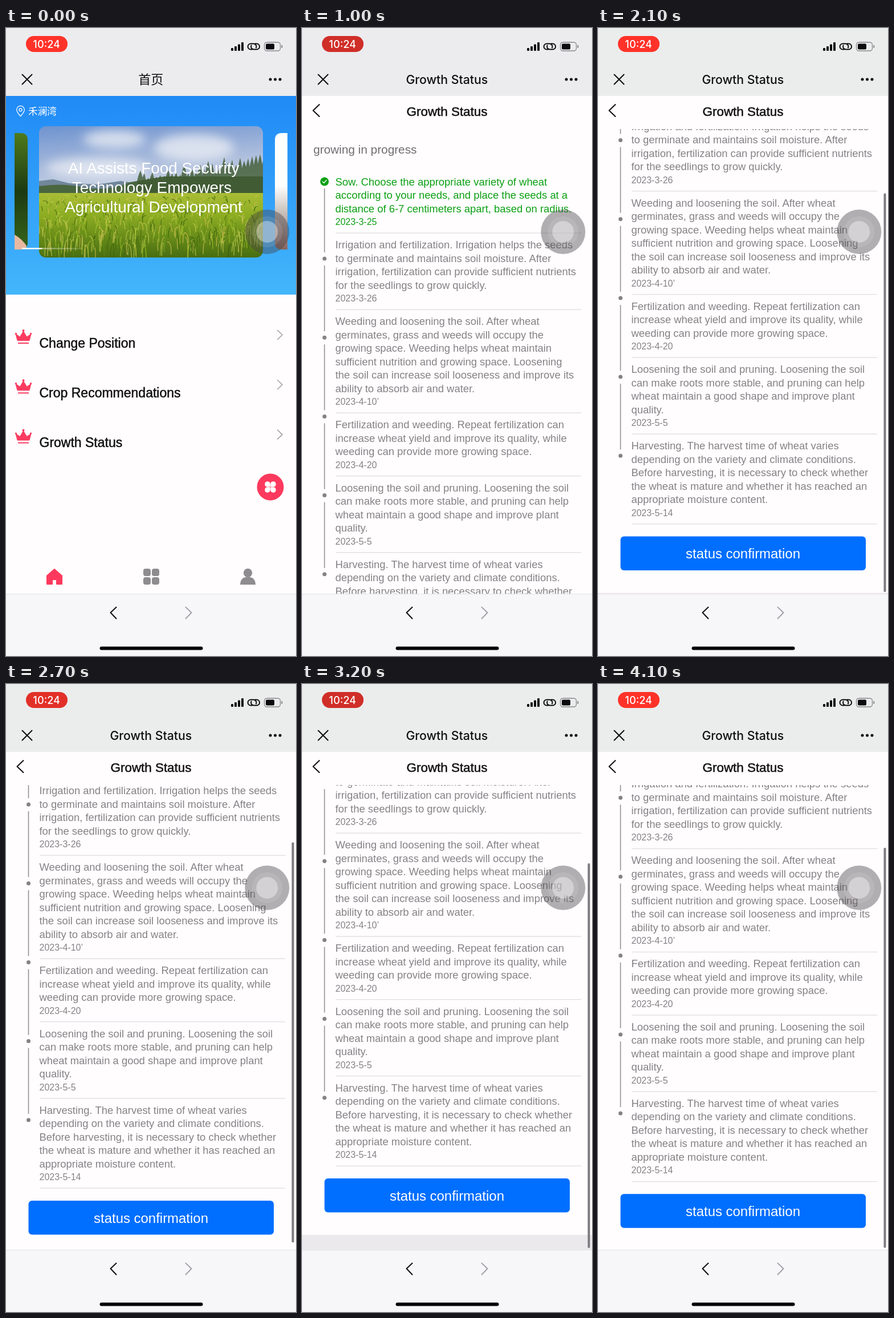
An HTML page that plays this animation: 509 by 1100 pixels, repeating every 4.2 s.

```html
<!DOCTYPE html>
<html lang="en">
<head>
<meta charset="utf-8">
<title>Growth Status</title>
<style>
  html, body { margin: 0; width: 100%; height: 100%; overflow: hidden; background: #fff; }
  svg { display: block; width: 509px; height: 1100px; }
  text { font-family: "Liberation Sans", Arial, sans-serif; white-space: pre; }
  .ui { font-family: Inter, "Noto Sans CJK SC", "Noto Sans CJK", sans-serif; }
  .cjk { font-family: "Noto Sans CJK SC", "Noto Sans CJK", sans-serif; }
  .medium { font-size: 23px; stroke: #111; stroke-width: .5; fill: #111; }
  .line { fill: none; stroke-width: 2; stroke-linecap: round; stroke-linejoin: round; }
  .mid { text-anchor: middle; }
</style>
</head>
<body>
<svg viewBox="0 0 509 1100" xmlns="http://www.w3.org/2000/svg">
  <defs>
    <linearGradient id="blue" x2="0" y2="1"><stop stop-color="#208af6"/><stop offset="1" stop-color="#43b6fb"/></linearGradient>
    <linearGradient id="sky" x2=".25" y2="1"><stop stop-color="#6e93cf"/><stop offset=".55" stop-color="#a9bbdc"/><stop offset="1" stop-color="#d3d9e6"/></linearGradient>
    <linearGradient id="field" x2="0" y2="1"><stop stop-color="#a9bd35"/><stop offset=".35" stop-color="#8cac22"/><stop offset="1" stop-color="#476d10"/></linearGradient>
    <linearGradient id="leaf" x2="0" y2="1"><stop stop-color="#4f7a1c"/><stop offset=".5" stop-color="#1d3a12"/><stop offset="1" stop-color="#38661c"/></linearGradient>
    <linearGradient id="soil" x2="0" y2="1"><stop offset=".45" stop-color="#fff"/><stop offset=".65" stop-color="#cfc9c4"/><stop offset="1" stop-color="#8a665f"/></linearGradient>
    <linearGradient id="dash"><stop offset=".32" stop-color="#fff"/><stop offset=".36" stop-color="#fff" stop-opacity=".4"/><stop offset="1" stop-color="#fff" stop-opacity=".15"/></linearGradient>
    <filter id="soft"><feGaussianBlur stdDeviation="9"/></filter>
    <clipPath id="card"><rect x="58" y="172" width="393" height="230" rx="12"/></clipPath>
    <clipPath id="view"><rect y="177" width="509" height="815"/></clipPath>
    <clipPath id="left"><path d="M15 184h11q12 0 12 12v180q0 12-12 12H15z"/></clipPath>
  </defs>
  <rect width="509" height="1100" fill="#fffdfe"/>

  <g id="home">
    <rect y="119" width="509" height="348" fill="url(#blue)"/>
    <g class="line" stroke="#fff" style="stroke-width:1.3">
      <path d="M25.500 154.500c-4-4.500-6.800-7.500-6.800-11.300a6.800 6.800 0 0 1 13.600 0c0 3.800-2.800 6.800-6.800 11.300z"/><circle cx="25.500" cy="143.300" r="2.500"/>
    </g>
    <text class="cjk" x="39" y="151.500" font-size="16.700" fill="#fff">禾澜湾</text>
    <g clip-path="url(#left)">
      <rect x="15" y="184" width="23" height="204" fill="url(#leaf)"/>
      <path d="M15 362q14 8 22 21l-8 6H15z" fill="#e8b9a2"/>
    </g>
    <path d="M494 184h-10q-12 0-12 12v180q0 12 12 12h10z" fill="url(#soil)"/>
    <g clip-path="url(#card)">
      <rect x="58" y="172" width="393" height="130" fill="url(#sky)"/>
      <g fill="#eef0f5" opacity=".75" filter="url(#soft)">
        <ellipse cx="190" cy="195" rx="55" ry="16"/><ellipse cx="330" cy="210" rx="70" ry="24"/><ellipse cx="160" cy="245" rx="90" ry="18"/>
      </g>
      <path d="M58 268l25-3 28 7 50 2 40-6 60 8v20H58z" fill="#71879b"/>
      <path d="M58 277q40-6 80 2t80-9l60-10h173v32H58z" fill="#49663f"/>
      <path id="trees" fill="#3f5a33" opacity=".8"/>
      <rect x="58" y="289" width="393" height="113" fill="url(#field)"/>
      <g id="blades" fill="none" stroke-linecap="round"></g>
    </g>
    <g font-size="27.900" fill="#fff" class="mid">
      <text x="259" y="254.500">AI Assists Food Security</text>
      <text x="256" y="289">Technology Empowers</text>
      <text x="259" y="323">Agricultural Development</text>
    </g>
    <rect x="28" y="385" width="104" height="2.500" fill="url(#dash)"/>
    <g id="menu"></g>
    <circle cx="464" cy="804" r="23.500" fill="#fd3a5d"/>
    <path d="M463 803h-4.500a4 4 0 1 1 4.500-4.500zM465 803v-4.500a4 4 0 1 1 4.500 4.500zM463 805v4.500a4 4 0 1 1-4.500-4.500zM465 805h4.500a4 4 0 1 1-4.500 4.500z" fill="#fff" stroke="#fff" stroke-width="1.500" stroke-linejoin="round"/>
    <path d="M85 948l13 11.500v14.500h-9v-8h-8v8h-9v-14.500z" fill="#fd3a5d" stroke="#fd3a5d" stroke-width="2" stroke-linejoin="round"/>
    <g fill="#8e8c8f">
      <rect x="241" y="947" width="13" height="13" rx="4"/><rect x="256" y="947" width="13" height="13" rx="4"/>
      <rect x="241" y="962" width="13" height="13" rx="4"/><rect x="256" y="962" width="13" height="13" rx="4"/>
      <circle cx="424.500" cy="954.500" r="7.700"/><path d="M411 975q0-11 9-13h9q9 2 9 13z"/>
    </g>
  </g>

  <g id="status">
    <g clip-path="url(#view)">
      <rect y="177" width="509" height="815" fill="#ece9ec"/>
      <g id="page">
        <rect width="509" height="1197" fill="#fffdfe"/>
        <text x="20" y="220" font-size="20.800" fill="#6f6d70">growing in progress</text>
      </g>
    </g>
    <path class="line" d="M30.500 134L19.500 144.500L30.500 155" stroke="#111"/>
    <text class="medium mid" x="254.500" y="154" style="font-size:22.400px">Growth Status</text>
    <rect id="bar" x="501.500" width="4" rx="2" fill="#7d7b7f"/>
  </g>

  <rect id="head" width="509" height="119"/>
  <rect id="pill" x="35" y="14" width="73" height="28" rx="14"/>
  <text class="ui mid" x="71.200" y="34.600" font-size="18.200" font-weight="500" fill="#fff">10:24</text>
  <g fill="#0c0c0e">
    <rect x="395" y="35" width="4" height="5" rx="1"/><rect x="401" y="32" width="4" height="8" rx="1"/>
    <rect x="407" y="28.500" width="4" height="11.500" rx="1"/><rect x="413" y="25" width="4" height="15" rx="1"/>
    <rect x="456" y="27.500" width="15" height="10" rx="2"/>
    <circle cx="464" cy="90" r="2.500"/><circle cx="472.500" cy="90" r="2.500"/><circle cx="481" cy="90" r="2.500"/>
  </g>
  <g class="line" stroke="#0c0c0e">
    <path d="M432 37.500h-2.500a5 5 0 0 1 0-10h5a5 5 0 0 1 4.500 7M437 27.500h3a5 5 0 0 1 0 10h-5a5 5 0 0 1-4.500-7"/>
    <rect x="453.500" y="25" width="28" height="15" rx="4.500" stroke="#88878a" style="stroke-width:1.300"/>
    <path d="M484.300 31v3" stroke="#88878a"/>
    <path d="M28.500 81.500l17 17M45.500 81.500l-17 17"/>
  </g>
  <text id="title" class="ui mid" x="254.300" y="97.800" fill="#111" font-weight="500"></text>

  <rect y="991" width="509" height="109" fill="#f7f6f9"/>
  <rect y="991" width="509" height="1" fill="#e6e4e8"/>
  <path class="line" d="M193.500 1014.500L183.500 1024L193.500 1034.500" stroke="#111"/>
  <path class="line" d="M315.500 1014.500L325.500 1024L315.500 1034.500" stroke="#a5a4a8"/>
  <rect x="164.500" y="1083.500" width="181" height="6" rx="3" fill="#050505"/>

  <circle cx="458.300" cy="357" r="39" fill="#464146" fill-opacity=".42"/>
  <circle cx="458.300" cy="357" r="27" fill="#fff" fill-opacity=".1"/>
  <circle cx="458.300" cy="357" r="19" fill="#fff" fill-opacity=".36"/>
</svg>

<script>
const $ = id => document.getElementById(id);
const add = (id, markup) => $(id).insertAdjacentHTML('beforeend', markup);
const set = (id, attrs) => { for (const k in attrs) $(id).setAttribute(k, attrs[k]); };

let seed = 7;
const rnd = (a, b) => a + (b - a) * ((seed = seed * 16807 % 2147483647) / 2147483647);

// Banner photo: tree row and rice
let trees = '';
for (let x = 236; x < 455; x += 7) {
  const tip = 262 - (x - 236) * .17 + rnd(-12, 8), h = 290 - tip;
  trees += `M${x} ${tip}q${rnd(5, 9)} 24 4 ${h}h-8q-6 ${-h / 2} 4 ${-h}z`;
}
set('trees', { d: trees });
['#c3cf55', '#5d8a14', '#d2c255', '#3c620c', '#a0c22c'].forEach(color => {
  let d = '';
  for (let i = 0; i < 110; i++) {
    const depth = rnd(0, 1), y = 296 + depth * 108, h = 3 + depth * 20;
    d += `M${rnd(58, 451)} ${y}q${rnd(-2, 2)} ${-h} ${rnd(-7, 7)} ${-h}`;
  }
  add('blades', `<path d="${d}" stroke="${color}" stroke-width="1.3" opacity=".75"/>`);
});

['Change Position', 'Crop Recommendations', 'Growth Status'].forEach((label, i) => add('menu', `
  <g transform="translate(0 ${i * 87.3})">
    <path d="M20 547.500L17 536l7.500 5L30.500 531l6 10 7.500-5-3 11.500z" fill="#fb3b60" stroke="#fb3b60" stroke-linejoin="round"/>
    <path d="M21 552h19" stroke="#fb3b60" stroke-width="2"/>
    <g fill="#fb3b60"><circle cx="30.500" cy="530" r="2"/><circle cx="17.500" cy="535.500" r="1.700"/><circle cx="43.500" cy="535.500" r="1.700"/></g>
    <text class="medium" x="58.500" y="559.500">${label}</text>
    <path class="line" d="M476.500 529.500L485 537.500L476.500 545.500" stroke="#a09ea1" style="stroke-width:1.5"/>
  </g>`));

const steps = [
  ['2023-3-25', 'Sow. Choose the appropriate variety of wheat|according to your needs, and place the seeds at a|distance of 6-7 centimeters apart, based on radius.'],
  ['2023-3-26', 'Irrigation and fertilization. Irrigation helps the seeds|to germinate and maintains soil moisture. After|irrigation, fertilization can provide sufficient nutrients|for the seedlings to grow quickly.'],
  ['2023-4-10’', 'Weeding and loosening the soil. After wheat|germinates, grass and weeds will occupy the|growing space. Weeding helps wheat maintain|sufficient nutrition and growing space. Loosening|the soil can increase soil looseness and improve its|ability to absorb air and water.'],
  ['2023-4-20', 'Fertilization and weeding. Repeat fertilization can|increase wheat yield and improve its quality, while|weeding can provide more growing space.'],
  ['2023-5-5', 'Loosening the soil and pruning. Loosening the soil|can make roots more stable, and pruning can help|wheat maintain a good shape and improve plant|quality.'],
  ['2023-5-14', 'Harvesting. The harvest time of wheat varies|depending on the variety and climate conditions.|Before harvesting, it is necessary to check whether|the wheat is mature and whether it has reached an|appropriate moisture content.']
];
let rowY = 248.5;
steps.forEach(([date, body], i) => {
  const lines = body.split('|'), end = rowY + lines.length * 23.5 + 40;
  const dot = i ? 404 + (i - 1) * 138.2 : 269;
  const next = 404 + i * 138.2;
  const text = lines.map((s, n) => `<text x="58.500" y="${rowY + 27 + n * 23.5}" font-size="18.430">${s}</text>`).join('');
  add('page', `<g fill="${i ? '#848285' : '#0aa012'}">${text}
    <text x="58.500" y="${end - 14}" font-size="16">${date}</text>
    <circle cx="39.500" cy="${dot}" r="${i ? 3.5 : 7.5}"/></g>
    <rect x="59" y="${end - .5}" width="431" height="1.300" fill="#e0dee1"/>`);
  if (i < 5) add('page', `<path d="M39.500 ${dot + 12}V${next - 11}" stroke="#929093" stroke-width="1.600"/>`);
  rowY = end;
});
add('page', `<path class="line" d="M36 269l2.500 2.500 4.500-5" stroke="#fff" style="stroke-width:1.300"/>
  <rect x="39.500" y="1098" width="430.500" height="59.500" rx="6" fill="#006fff"/>
  <text class="mid" x="254.500" y="1136.500" font-size="23.950" fill="#fff">status confirmation</text>`);

// Scroll position over time: fling, bounce, drag back, second bounce
const LOOP = 4200, MAX = 205;
const keys = [[1200, 0], [1450, 130], [1600, 219], [1700, 216], [1900, 210.3], [2100, 207.5], [2400, 205],
  [2550, 197], [2700, 193], [2900, 196], [3000, 204], [3200, 232], [3350, 228], [3600, 212], [3850, 206.5], [4100, 204.7]];
const slope = i => {
  const a = keys[i - 1], b = keys[i + 1];
  return a && b ? (b[1] - a[1]) / (b[0] - a[0]) : 0;
};
function scrollAt(t) {
  if (t <= keys[0][0]) return 0;
  const i = keys.findIndex(k => k[0] >= t) - 1;
  if (i < 0) return keys[keys.length - 1][1];
  const [t0, a] = keys[i], [t1, b] = keys[i + 1], w = t1 - t0, u = (t - t0) / w, v = 1 - u;
  return v * v * (1 + 2 * u) * a + u * u * (3 - 2 * u) * b + w * u * v * (v * slope(i) - u * slope(i + 1));
}

function draw(now) {
  const t = Math.floor(now % LOOP / 100) * 100;
  const home = t < 300, s = scrollAt(t), over = Math.max(0, s - MAX);
  const glow = (1 + Math.cos(t / 2100 * 2 * Math.PI)) / 2;
  set('home', { display: home ? 'inline' : 'none' });
  set('status', { display: home ? 'none' : 'inline' });
  set('title', { 'font-size': home ? 22 : 21.2 });
  $('title').textContent = home ? '首页' : 'Growth Status';
  set('page', { transform: `translate(0 ${-s})` });
  set('bar', { y: 121 + .81 * Math.min(s, MAX) + over, height: 701 - over, opacity: t >= 1300 ? 1 : 0 });
  set('head', { fill: t < 1300 ? '#ecebee' : '#ebecec' });
  set('pill', { fill: `rgb(${208 + 47 * glow},${46 + 4 * glow},${40 + glow})` });
  requestAnimationFrame(draw);
}
draw(0);
</script>
</body>
</html>
```
